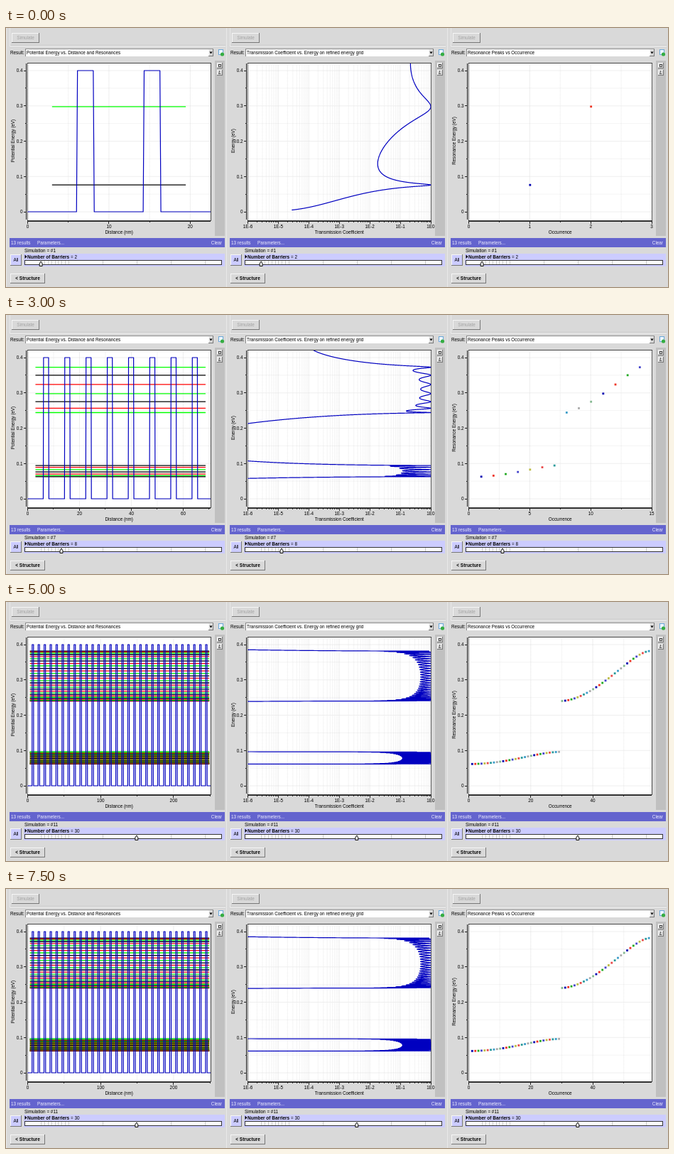
These frames come from a looping animation (932 by 365 pixels, 8000 ms). An HTML page:

```html
<!DOCTYPE html>
<html lang="en">
<head>
<meta charset="utf-8">
<title>Resonances of a multi-barrier structure</title>
<style>
html, body { margin: 0; width: 932px; height: 365px; overflow: hidden; background: #d9d9d9; }
svg { display: block; font: 6.35px "Liberation Sans", Arial, sans-serif; }
.state { display: none; }
.state.on { display: inline; }
.bold { font-weight: bold; font-size: 6.5px; }
.box { shape-rendering: crispEdges; }
.axis { stroke: #222; stroke-width: 1; fill: none; shape-rendering: crispEdges; }
.grid { stroke: #cfcfcf; stroke-width: .7; stroke-dasharray: 1 1; fill: none; }
.minor { stroke: #e0e0e0; }
.curve { stroke: #0000c0; stroke-width: 1.2; fill: none; stroke-linejoin: round; }
</style>
</head>
<body>
<svg id="stage" width="932" height="365" viewBox="0 0 932 365"></svg>
<script>
const OFFSETS = [0, 310, 621];
const COUNTS = [2, 3, 4, 5, 6, 7, 8, 9, 10, 20, 30, 40, 50];
const ORDER = [0, 1, 2, 3, 4, 5, 6, 7, 8, 9, 10, 11, 12, 12, 11, 10];
const STEP = 500;
const TITLES = [
  ["Potential Energy vs. Distance and Resonances", "Potential Energy (eV)", "Distance (nm)"],
  ["Transmission Coefficient vs. Energy on refined energy grid", "Energy (eV)", "Transmission Coefficient"],
  ["Resonance Peaks vs Occurrence", "Resonance Energy (eV)", "Occurrence"]
];
const LEVEL_COLORS = ["#000", "#0f0", "#f00"];
const DOT_COLORS = ["#0000b0", "#ee3322", "#22aa22", "#4444cc", "#bcbc44",
                    "#e84848", "#2a9a9a", "#3a9cc8", "#aaaaaa", "#84b890"];

// Plot area
const L = 30.5, R = 288, TOP = 50, BOTTOM = 270;
const yOf = e => 259 - e * 497.5;
const fix = v => v.toFixed(2);

// SVG helpers
const rect = (x, y, w, h, fill, stroke = "none") =>
  `<rect class="box" x="${x}" y="${y}" width="${w}" height="${h}" fill="${fill}" stroke="${stroke}"/>`;
const path = (d, cls, extra = "") => `<path class="${cls}" d="${d}" ${extra}/>`;
const text = (x, y, s, { anchor = "start", fill = "#000", cls = "", extra = "" } = {}) =>
  `<text x="${x}" y="${y + 2.3}" text-anchor="${anchor}" fill="${fill}" class="${cls}" ${extra}>${s}</text>`;
const raised = (x, y, w, h, fill = "#d9d9d9") =>
  rect(x, y, w, h, "#777") + rect(x, y, w - 1, h - 1, "#f6f6f6") + rect(x + 1, y + 1, w - 2, h - 2, fill);

// Periodic barrier model: 0.4 eV barriers 2 nm wide, 6 nm wells
const V = 0.4, WELL = 6, BARRIER = 2, MASS = 1.7585;

function cell(e) {
  const k = Math.sqrt(MASS * e), q = MASS * (V - e), s = Math.sqrt(Math.abs(q)) || 1e-9;
  const c = q > 0 ? Math.cosh(s * BARRIER) : Math.cos(s * BARRIER);
  const sh = (q > 0 ? Math.sinh(s * BARRIER) : Math.sin(s * BARRIER)) / s;
  return {
    trace: Math.cos(k * WELL) * c + (q - k * k) / (2 * k) * sh * Math.sin(k * WELL),
    scatter: (q + k * k) / (2 * k) * sh
  };
}

function logTransmission(e, n) {
  const { trace, scatter } = cell(e), f = Math.abs(trace);
  const a = f < 1 ? Math.acos(f) : Math.acosh(f);
  const u = a < 1e-7 ? n : f < 1 ? Math.sin(n * a) / Math.sin(a) : Math.sinh(n * a) / Math.sinh(a);
  return -Math.log10(1 + (scatter * u) ** 2);
}

function solve(goal, lo, hi, sign) {
  for (let i = 0; i < 40; i++) {
    const mid = (lo + hi) / 2;
    if (sign * (cell(mid).trace - goal) < 0) lo = mid; else hi = mid;
  }
  return lo;
}

function resonances(n) {
  const low = [], high = [];
  for (let j = 1; j < n; j++) {
    const goal = Math.cos(j * Math.PI / n);
    low.push(solve(goal, 0.05, 0.115, -1));
    high.push(solve(-goal, 0.22, 0.4, 1));
  }
  return low.concat(high);
}

// Axes
function nice(v, round) {
  const p = 10 ** Math.floor(Math.log10(v)), f = v / p;
  const cuts = round ? [1.5, 3, 7] : [1, 2, 5];
  return p * (f <= cuts[0] ? 1 : f <= cuts[1] ? 2 : f <= cuts[2] ? 5 : 10);
}

function xTick(x, label) {
  const major = label !== "";
  return path(`M${fix(x)} ${BOTTOM}V${TOP}`, major ? "grid" : "grid minor") +
    path(`M${fix(x)} 272V${major ? 276 : 274}`, "axis") +
    (major ? text(fix(x), 279.5, label, { anchor: "middle" }) : "");
}

function linearTicks(max) {
  const step = nice(nice(max, false) / 4, true);
  let out = "";
  for (let i = 0; i * step / 2 <= max * 1.0001; i++) {
    const v = i * step / 2;
    out += xTick(L + v / max * (R - L), i % 2 ? "" : String(v));
  }
  return out;
}

function logTicks() {
  const decade = (R - L) / 6;
  let out = "";
  for (let p = 0; p <= 6; p++) {
    out += xTick(L + p * decade, "1E" + (p - 6));
    for (let m = 2; m < 10 && p < 6; m++) out += xTick(L + (p + Math.log10(m)) * decade, "");
  }
  return out;
}

function yTicks() {
  let out = "";
  for (let i = 0; i <= 8; i++) {
    const y = yOf(i * 0.05), major = i % 2 === 0;
    out += path(`M${L} ${fix(y)}H${R}`, major ? "grid" : "grid minor") +
      path(`M${major ? 24.5 : 26.5} ${fix(y)}H28.5`, "axis");
    if (major) out += text(23.5, y, i ? (i * 0.05).toFixed(1) : "0", { anchor: "end" });
  }
  return out;
}

// Fixed parts of one panel
function panel([title, yName, xName], index) {
  const gray = "#a3a3a3";
  let out = rect(0, 0, 1, 365, "#e9e9e9") +
    rect(5, 25, 304, 1, "#f2f2f2") + rect(5, 24, 304, 1, "#c6c6c6") + rect(5, 0, 1, 25, "#e8e8e8") +
    raised(8, 7, 39, 14) + text(27.5, 14, "Simulate", { anchor: "middle", fill: gray }) +
    text(6, 34.5, "Result:") +
    rect(27, 29, 265, 11, "#888") + rect(28, 30, 264, 10, "#fff") +
    text(29, 34.5, title) + raised(285, 30, 7, 10) +
    path("M286.5 33.5h4l-2 3z", "") +
    rect(299, 30, 7, 8, "#6aa8d8") + rect(300, 31, 5, 6, "#eef6ff") +
    `<circle cx="304.5" cy="37" r="2.6" fill="#35ad42"/>`;
  out += rect(294, 46, 14, 247, "#c0c0c0") +
    raised(297, 49, 8, 8) + `<rect x="299.5" y="51.5" width="3" height="3" fill="none" stroke="#222" stroke-width=".8"/>` +
    raised(297, 59, 8, 8) + text(301, 63, "L", { anchor: "middle", extra: 'font-style="italic"' });
  out += rect(L - .5, TOP - 1, R - L + 1, BOTTOM - TOP + 2, "#fff", "#444") +
    path(`M28.5 ${TOP}V${BOTTOM}M${L} 272H${R}`, "axis") + yTicks() +
    (index === 1 ? logTicks() : "") +
    text(10, 159, yName, { anchor: "middle", extra: 'transform="rotate(-90 10 159)"' }) +
    text((L + R) / 2, 287.5, xName, { anchor: "middle" });
  const pale = { fill: "#eeeeff" };
  out += rect(5, 296, 303, 13, "#6464ce") + text(7, 302.5, "13 results", pale) +
    text(44, 302.5, "Parameters...", pale) + text(304, 302.5, "Clear", { ...pale, anchor: "end" }) +
    raised(6, 319, 16, 16, "#ccccff") + text(14, 327, "All", { anchor: "middle" }) +
    rect(25, 318, 283, 18, "#ccccff") +
    path("M26.5 319.5v5.4l3-2.7z", "") +
    text(30, 322.5, "Number of Barriers", { cls: "bold" }) +
    rect(26, 327, 278, 7, "#333") + rect(27, 328, 276, 5, "#fff");
  for (const n of COUNTS) out += rect(fix(handleX(n)), 328, 1, 5, "#c8c8c8");
  return out + raised(6, 346, 49, 14) + text(30.5, 353, "&lt; Structure", { anchor: "middle", cls: "bold" });
}

// Parts that follow the number of barriers
const handleX = n => 39.7 + 4.81 * n;

function controls(n, index) {
  const x = fix(handleX(n) - .2);
  return text(26, 313.5, `Simulation = #${index + 1}`) + text(91, 322.5, `= ${n}`) +
    path(`M${x} 329l2 2.8v3.7h-4v-3.7z`, "", 'fill="#e6e6e6" stroke="#111" stroke-width="1"');
}

function potential(n, levels) {
  const period = 8.2, span = period * n + 4.6 + 3 / n;
  const x = nm => fix(L + nm / span * (R - L));
  const floor = fix(yOf(0)), roof = fix(yOf(V));
  let d = `M${L} ${floor}`, lines = "";
  for (let i = 0; i < n; i++) {
    const a = 6.07 + period * i, b = a + 2.06;
    d += `L${x(a - .06)} ${floor}L${x(a + .06)} ${roof}L${x(b - .06)} ${roof}L${x(b + .06)} ${floor}`;
  }
  levels.forEach((e, i) => {
    lines += path(`M${x(3)} ${fix(yOf(e))}H${x(period * n + 3.05)}`, "",
      `stroke="${LEVEL_COLORS[i % 3]}" stroke-width="1.3"`);
  });
  return linearTicks(span) + lines + path(d + `H${R}`, "curve");
}

function transmission(n) {
  const points = [];
  for (let e = 0.005; e < 0.4205; e += 0.00005) {
    const x = R + Math.max(-9, logTransmission(e, n)) * (R - L) / 6;
    points.push(fix(x) + " " + fix(yOf(e)));
  }
  return `<g clip-path="url(#plot)">${path("M" + points.join("L"), "curve")}</g>`;
}

function peaks(n, levels) {
  const max = 2 * n - 1;
  return linearTicks(max) + levels.map((e, i) => {
    const x = L + .5 + (i + 1) / max * (R - L);
    return `<rect x="${fix(x - 1.4)}" y="${fix(yOf(e) - 1.4)}" width="2.8" height="2.8" fill="${DOT_COLORS[i % 10]}"/>`;
  }).join("");
}

const place = (i, body) => `<g transform="translate(${OFFSETS[i]} 0)">${body}</g>`;

function state(n, index) {
  const levels = resonances(n);
  const plots = [potential(n, levels), transmission(n), peaks(n, levels)];
  return `<g class="state">${plots.map((p, i) => place(i, p + controls(n, index))).join("")}</g>`;
}

const stage = document.getElementById("stage");
stage.innerHTML =
  `<clipPath id="plot"><rect x="${L}" y="${TOP}" width="${R - L + .5}" height="${BOTTOM - TOP}"/></clipPath>` +
  TITLES.map((t, i) => place(i, panel(t, i))).join("") + COUNTS.map(state).join("");

const states = [...stage.querySelectorAll(".state")];
const start = performance.now();
let shown = -1;

function tick() {
  const slot = Math.floor((performance.now() - start) / STEP) % ORDER.length;
  if (ORDER[slot] !== shown) {
    shown = ORDER[slot];
    states.forEach((s, i) => s.classList.toggle("on", i === shown));
  }
  requestAnimationFrame(tick);
}
tick();
</script>
</body>
</html>
```
